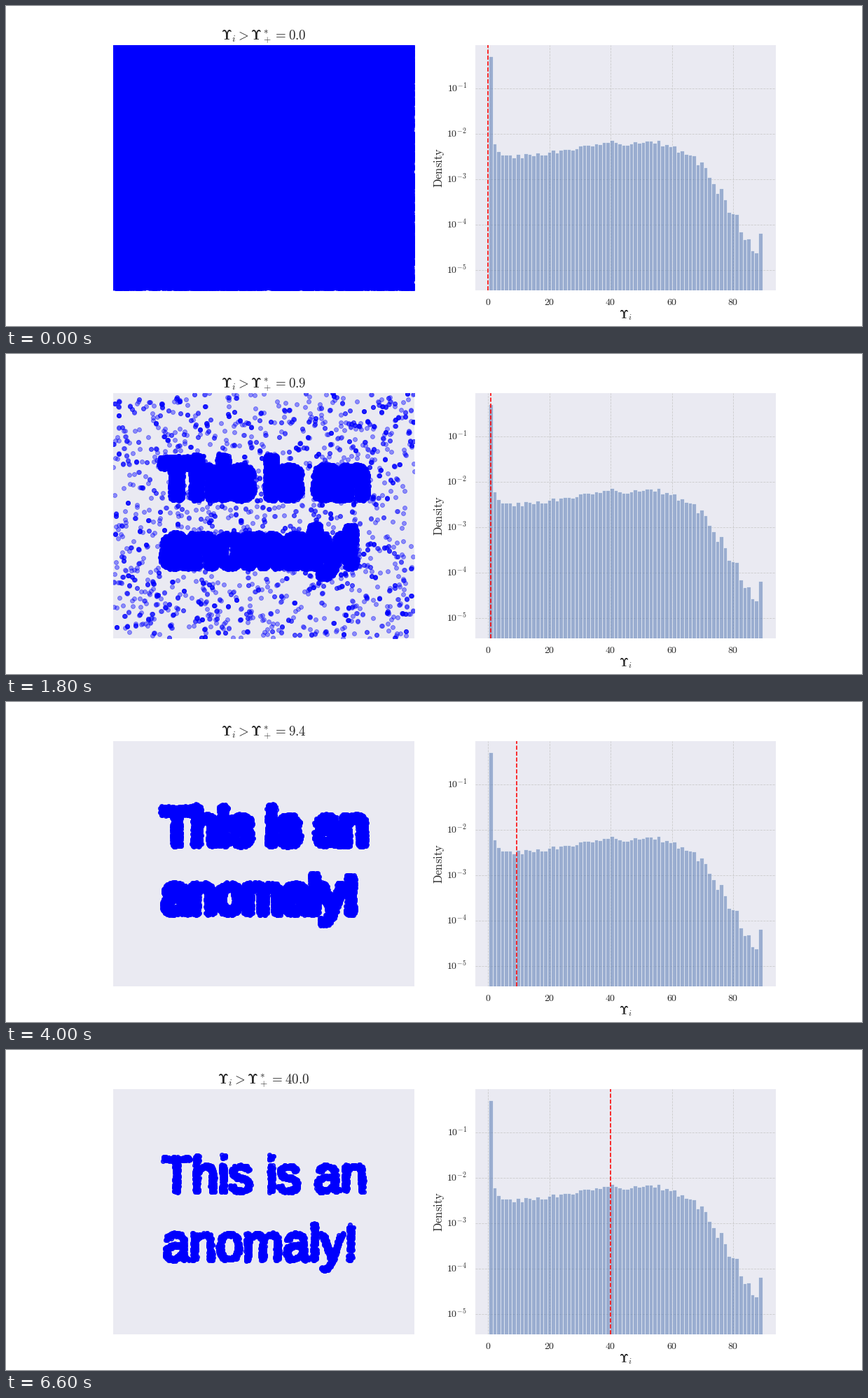
A matplotlib script for the animation above (9000 ms loop, 1222 by 458 pixels).

```python
import numpy as np
import matplotlib.pyplot as plt
from matplotlib.animation import FuncAnimation
from matplotlib.path import Path
from matplotlib.textpath import TextPath

plt.rcParams["mathtext.fontset"] = "cm"

W, H, DPI = 1222, 458, 100
FRAMES, STEP_MS = 45, 200
INK, PANEL = "#262626", "#EAEAF2"
UPSILON = r"\mathbf{" + chr(0xA8) + "}"  # bold capital upsilon in Computer Modern
rng = np.random.default_rng(4)


def threshold(step):
    """The threshold creeps up at first, then sweeps on and rests at 40."""
    return np.interp(step, [0, 1, 11, 12, 17, 18, 23, 24, 30, 33],
                     [0, 0.5, 1, 1.1, 4, 5, 16, 25, 32, 40])


def segment_distance(pts, a, b):
    d = b - a
    t = np.clip((pts - a) @ d / (d @ d), 0, 1)
    return np.hypot(*(pts - a - t[:, None] * d).T)


def text_cloud(lines, size, count, box):
    """Random points around the lettering, scored by distance to it."""
    x0, x1, y0, y1 = box
    pts = rng.uniform((x0, y0), (x1, y1), (count, 2))
    dist = np.full(count, np.inf)
    inside = np.zeros(count, bool)
    for x, y, text in lines:
        outline = TextPath((x, y), text, size=size,
                           prop={"family": "Liberation Sans"})
        for poly in outline.to_polygons():
            inside ^= Path(poly).contains_points(pts)
            for a, b in zip(poly[:-1], poly[1:]):
                if not np.allclose(a, b):
                    dist = np.minimum(dist, segment_distance(pts, a, b))
    dist += rng.normal(0, 0.3, count)
    dist[inside] = 0
    score = np.interp(dist, [0.3, 2.8, 4.9, 6.5], [40, 16, 4, 0.8],
                      left=90, right=0)
    return np.repeat(pts, 3, axis=0), np.repeat(score, 3)


def noise_cloud(width, height, n=30000):
    """Small clumps all over the panel, few of them with a high score."""
    rank = np.log(np.arange(1, n + 1))
    score = np.interp(rank, np.log([1, 400, 2300, 9500, n]),
                      [4, 1.1, 0.8, 0.7, 0.5])
    spots = rng.uniform((0, 0), (width, height), (n, 2))
    copies = np.minimum(rng.geometric(0.55, n), 4)
    pts = np.repeat(spots, copies, axis=0)
    return pts + rng.normal(0, 0.3, pts.shape), np.repeat(score, copies)


def histogram(bins=70):
    """Densities: a spike at zero, a broad hump and a ragged tail."""
    depth = np.interp(np.arange(bins), [1, 4, 16, 23, 33, 43, 48, 54, 63, 69],
                      [2.23, 2.5, 2.45, 2.27, 2.2, 2.17, 2.33, 2.65, 3.83, 4.8])
    spread = 0.02 + 10 ** ((depth - 5.8) / 2)  # scarce bins scatter more
    depth += spread * rng.standard_normal(bins)
    depth[0] = 0.29
    return 10 ** -np.minimum(depth, 5.2)


fig = plt.figure(figsize=(W / DPI, H / DPI), dpi=DPI)


def panel(x0, y0, x1, y1, **limits):
    ax = fig.add_axes([x0 / W, 1 - y1 / H, (x1 - x0) / W, (y1 - y0) / H],
                      facecolor=PANEL, **limits)
    ax.spines[:].set_visible(False)
    ax.tick_params(which="both", length=0, labelbottom=False, labelleft=False)
    return ax


def label(x, y, text, px, ha="center", **kw):
    kw.setdefault("va", "baseline")
    return fig.text(x / W, 1 - y / H, text, fontsize=px * 72 / DPI, color=INK,
                    ha=ha, **kw)


# Point cloud
PW, PH = 458, 351
left = panel(153, 56, 583, 407, xlim=(0, PW), ylim=(0, PH), xticks=[], yticks=[])
words = [(74, 203.7, "This is an"), (75, 106, "anomaly!")]
text_pts, text_score = text_cloud(words, 73, 31000, (58, 404, 76, 274))
noise_pts, noise_score = noise_cloud(PW, PH)
points = np.vstack([noise_pts, text_pts])
scores = np.concatenate([noise_score, text_score])
cloud, = left.plot([], [], "o", color="blue", alpha=0.4, ms=4.3, mew=0.7)
title = label(367.5, 47.5, "", 19)

# Histogram
right = panel(670, 56, 1099, 407, yscale="log", xlim=(-4.11, 93.9),
              ylim=(10**-5.438, 10**-0.048))
x_ticks, decades = range(0, 81, 20), range(1, 6)
right.set_xticks(x_ticks)
right.set_yticks([10.0**-k for k in decades])
right.minorticks_off()
right.set_axisbelow(True)
right.grid(ls="--", lw=0.6, color="#CCCCCC")
density = histogram()
edges = np.linspace(0.23, 89.45, len(density) + 1)
right.bar(edges[:-1], density, np.diff(edges), align="edge",
          color="#4C72B0", edgecolor="white", lw=0.7, alpha=0.5)
marker = right.axvline(0, color="red", ls="--", lw=1.15)

for v in x_ticks:
    label(688 + 4.377 * v, 428.3, f"${v}$", 14)
for k in decades:
    label(658, 57.9 + 65.1 * k, f"$10^{{-{k}}}$", 14, ha="right")
label(884.5, 447, f"${UPSILON}_i$", 16.5)
label(628.5, 231.5, r"$\mathrm{Density}$", 16.5, ha="right", va="center",
      rotation=90)


def draw(i):
    t = threshold(i)
    left.set_facecolor("blue" if t == 0 else PANEL)
    cloud.set_data(*points[scores > t].T)
    marker.set_xdata([t, t])
    title.set_text(rf"${UPSILON}_i > {UPSILON}_+^* = {t:.1f}$")
    return cloud, marker, title


anim = FuncAnimation(fig, draw, frames=FRAMES, interval=STEP_MS,
                     repeat=True, repeat_delay=0)
plt.show()
```
